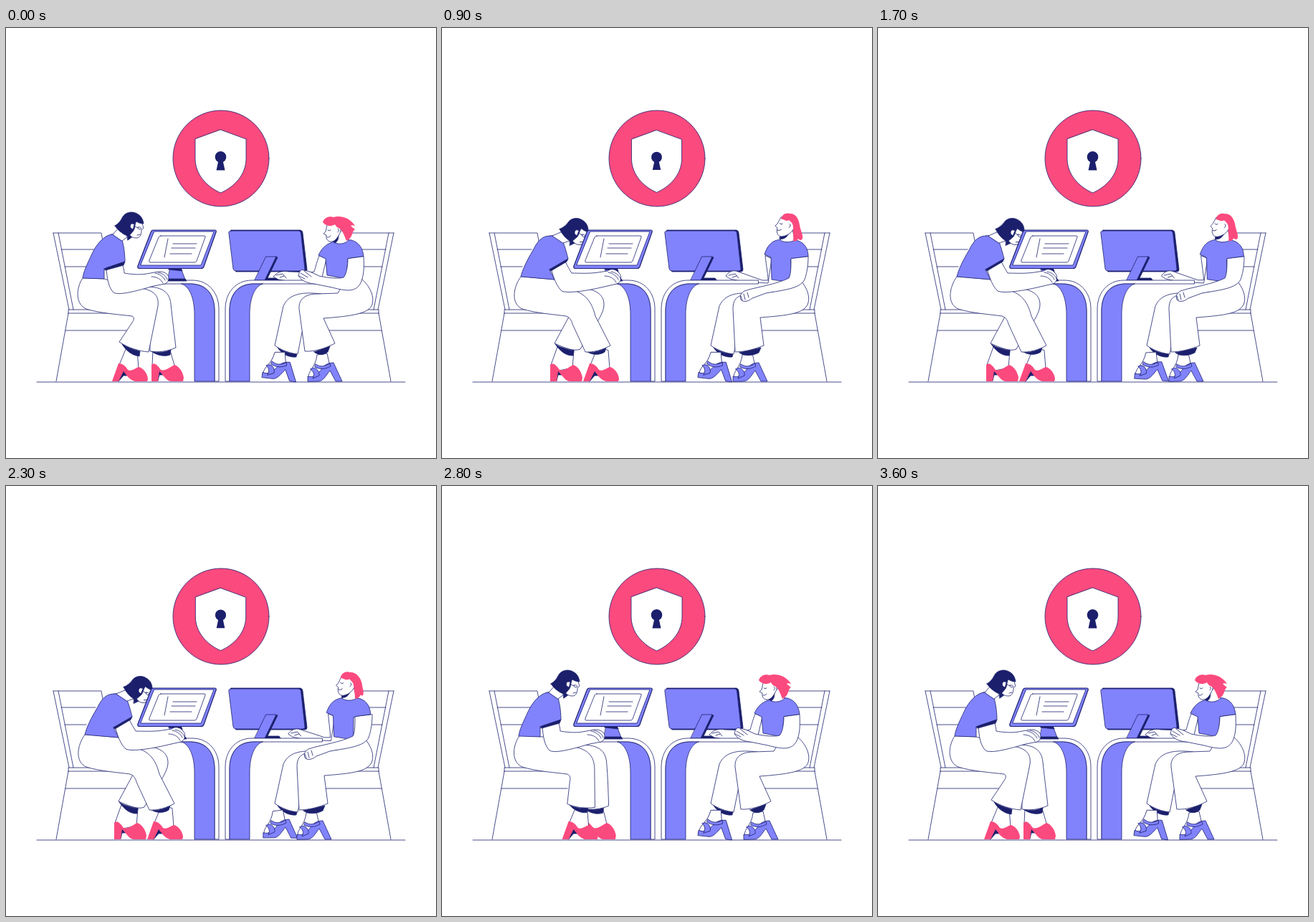
Write an HTML page that moves like this. It is 600 px wide and 600 px high and loops after 3700 ms.

```html
<!DOCTYPE html>
<html lang="en">
<head>
<meta charset="utf-8">
<title>Secure work</title>
<style>
html, body { margin: 0; width: 100%; height: 100%; overflow: hidden; background: #fff; }
svg { display: block; width: 100vw; height: 100vh; stroke: #1e226f; stroke-width: .8; stroke-linejoin: round; stroke-linecap: round; fill: none; }
.w { fill: #fff; }
.p { fill: #8183fd; }
.n { fill: #1b1f6c; }
.k { fill: #fb4a7e; }
.k.bare { stroke: none; }
</style>
</head>
<body>
<svg viewBox="0 0 600 600">
  <defs>
    <path id="chair" d="M66,286H133L139,320M66,286L88,393M73,286L94,393M77,309H125M82,333H112M87,398V393H175M87,398H178M87,398L70,493M83,422H175"/>
    <g id="desk">
      <path class="w" d="M162,352H260C283,352 297,370 297,392V493H291V395C291,372 280,357 258,357H162Z"/>
      <path class="p" d="M245,357H258C280,358 291,372 291,395V493H263V400C263,375 255,360 245,357Z"/>
    </g>
    <g id="sandal">
      <path class="w" d="M422,487C422,477 432,474 434,456L448,454 452,472 440,487Z"/>
      <path class="p" d="M421,493V486C429,489 436,482 441,475 445,469 451,467 457,467L469,493H460L452,478C447,484 443,493 436,493Z"/>
      <path class="p" d="M425,476C431,471 438,478 437,485L428,489C431,484 429,479 425,476ZM432,469C438,473 444,473 452,468L453,472C446,476 438,477 431,473Z"/>
    </g>
  </defs>

  <path d="M43,494H557"/>
  <use href="#chair"/>
  <use href="#chair" transform="matrix(-1 0 0 1 607 0)"/>

  <circle class="k" cx="300" cy="182" r="67"/>
  <path id="shield" class="w" d="M299.500,142L335,155V182C335,205 318,222 299.500,230 281,222 264,205 264,182V155Z"/>
  <path id="keyhole" class="n" stroke="none" d="M296,187A7.900,7.900 0 1 1 303,187L305.500,198.500H293.500Z"/>

  <use href="#desk"/>
  <g id="leftBody"></g>
  <g>
    <path class="p" d="M229,335H244L250,351H226Z"/>
    <path class="n" d="M228,335H244L246,339 227,337ZM225,350H250L252,353H225Z"/>
    <path class="p" stroke-width="1.2" d="M206,282H291Q294,282 293,285L276,333Q275,335.5 272,335.5H186Q183,335 184,332L202,285Q203,282 206,282Z"/>
    <path class="w" d="M207,284H290L272,331H188Z"/>
    <path class="w" d="M216,290H276Q279,290 278,292L266,325Q265,327 263,327H201Q199,327 200,324L213,292Q214,290 216,290ZM226,294L221,320M233,301H266M231,307H264M229,315H259"/>
  </g>
  <g id="leftArm"></g>

  <path class="n" d="M314,282H411Q414,283 414,286L420,337Q420,340 417,340H321Z"/>
  <path class="p" d="M314,283H408Q411,283 411.500,286L417,336Q417.500,339 414,339H321Q318,339 317,336L311,287Q310,283 314,283Z"/>
  <path class="n" d="M376,319L379,320 365,349H381L384,353H360Z"/>
  <path class="p" d="M363,319H377L361,352H347Z"/>
  <g id="reach"></g>
  <use href="#desk" transform="matrix(-1 0 0 1 603 0)"/>
  <g id="rightBody"></g>
</svg>
<script>
const LOOP = 3700, STEP = 100;
const $ = id => document.getElementById(id);

// time, value pairs
const tracks = {
  lean: [[100, 0], [500, 1], [2400, 1], [2800, 0]],
  near: [[100, 0], [500, .72], [800, 1], [2400, 1], [2800, .4], [3200, 0]],
  far: [[100, 0], [450, 1], [2400, 1], [2800, .1], [3000, 0]],
  back: [[200, 0], [500, .28], [900, 1], [1700, .95], [2300, .8], [2800, 0]],
  rest: [[500, 0], [900, 1], [2350, 1], [2800, 0]],
  tap: [[0, 1], [500, 0], [900, 1], [1700, .6], [2300, .1], [2800, 1], [3700, 1]],
  pulse: [[0, 0], [500, 1], [900, -.3], [1700, 0], [2300, -.2], [2800, 0]]
};

function at(track, t) {
  const i = track.findIndex(key => key[0] > t);
  if (i === 0) return track[0][1];
  if (i < 0) return track[track.length - 1][1];
  const [t0, a] = track[i - 1], [t1, b] = track[i];
  return a + (b - a) * (t - t0) / (t1 - t0);
}

const NUM = /-?\d+(\.\d+)?/g;

// blend two paths of the same structure
function mix(a, b, k) {
  const ends = b.match(NUM);
  let i = 0;
  return a.replace(NUM, n => (+n + (ends[i++] - n) * k).toFixed(2));
}

const path = (cls, d) => `<path class="${cls}" d="${d}"/>`;
const blend = (cls, k, a, b) => path(cls, mix(a, b, k));
const group = (transform, ...parts) => `<g transform="${transform}">${parts.join('')}</g>`;

function leftBody({ lean, near, far }) {
  return [
    group(`translate(${-52 * far} 0)`,
      blend('w', far,
        'M205,449L204,472L216,480L236,474L229,450Z',
        'M213,445L204,470L216,478L234,474L236,450Z'),
      path('n', 'M212,476L219,484 214,484 212,492Z'),
      path('k bare', 'M203,493V470C206,467 210,468 216,477C222,479 228,474 235,470C243,473 247,481 248,488L247,493H231C224,493 220,485 214,479L212,493Z')),
    blend('n', far,
      'M203,451C212,454 224,452 230,449L229,456C222,459 210,457 203,451Z',
      'M158,441C165,446 175,449 184,450L183,457C175,458 165,452 158,441Z'),
    blend('w', far,
      'M180,362C215,358 228,366 230,385C232,405 235,428 237,446C226,451 213,453 201,451L200,385Z',
      'M180,362C212,362 226,370 226,386C226,402 205,425 193,448C185,452 170,446 157,440L177,403Z'),
    group(`translate(${49 * near} 0)`,
      path('w', 'M168,446L158,470 170,480 185,475 183,450Z'),
      path('n', 'M163,477L170,485 164,485 157,493Z'),
      path('k bare', 'M148,493L157,468C163,468 167,472 170,477C176,480 180,474 186,473C194,476 198,485 198,490L197,493H180C172,491 168,484 164,479L157,493Z')),
    blend('n', near,
      'M162,441C172,447 180,450 187,451L186,458C176,457 167,450 162,441Z',
      'M203,452C212,454 222,450 229,446L227,452C222,456 210,457 203,452Z'),
    blend('w', near,
      'M107,349C98,362 96,385 112,392C130,398 160,400 176,402C180,404 178,408 176,411L158,438C170,446 185,451 199,452L212,388C214,372 205,364 180,362L137,350Z',
      'M110,347C99,362 96,385 112,392C130,398 160,400 173,402C179,404 181,409 182,413L200,452C210,453 225,449 235,443L214,402C209,382 200,370 180,365L157,351Z'),
    blend('p', lean,
      'M147,288C136,290 126,302 120,315C113,330 108,340 107,349L137,350L137,336L166,326C166,312 163,296 160,291C157,288 152,287 147,288Z',
      'M151,290C140,290 134,296 127,310C118,325 112,338 110,347L157,351L150,337L176,322C172,306 169,298 167,294C163,290 157,289 151,290Z'),
    blend('w', lean, 'M149,288L157,279L174,288L162,297Z', 'M154,290L168,284L184,295L169,300Z'),
    group(`translate(${12 * lean} ${8 * lean}) rotate(${10 * lean} 172 275)`,
      path('n', 'M169,288L177,291 170,296Z'),
      path('w', 'M174,266H188C190,272 191,277 192,279L189,282C189,288 187,293 182,293C177,293 173,291 171,286Z'),
      path('n', 'M152,276C157,273 160,269 162,265C165,259 170,257 176,257C185,258 191,264 192,273C188,273 185,272 182,270C179,273 181,281 176,285C174,288 172,290 169,290C162,287 156,282 152,276Z'),
      path('w', 'M179,274C175,271 172,275 174,279L177,281Z'),
      path('', 'M178,276L184,279M184,278q4,-1 5,2q-4,3 -5,-2M183,289l4,-1'))
  ].join('');
}

function leftArm({ lean }) {
  return [
    blend('w', lean,
      'M140,335C141,350 143,362 150,369C158,374 185,366 206,360L222,357C227,355 228,349 226,345C220,338 212,340 207,341L196,343C185,345 170,343 165,342C165,337 163,332 162,328Z',
      'M153,338C156,350 160,360 167,367C176,371 205,366 222,362L244,357C250,355 251,347 248,343C243,336 236,335 231,339L218,341C205,343 190,342 181,342C178,337 175,332 172,326Z'),
    group(`translate(${24 * lean} ${-lean})`,
      path('', 'M208,342C214,343 220,347 222,352M212,341C219,342 224,347 225,351M203,347C210,347 216,350 219,356')),
    blend('n', lean, 'M137,336L166,326L164,331L139,338Z', 'M150,337L176,322L174,326L152,339Z')
  ].join('');
}

function reach({ back, rest }) {
  const k = (back + rest) / 2;
  return blend('w', k,
    'M437,318C433,328 432,334 430,340L425,341L395,340C385,338 378,341 373,347L380,351L400,354L440,352L447,322Z',
    'M451,318C453,335 455,345 455,352L447,352L413,340C406,337 400,340 396,346L402,350L420,354L455,356L460,322Z') +
    group(`translate(${23 * k} 0)`, path('', 'M377,345L386,343 391,349M382,348L388,346'));
}

function rightBody({ back, rest, tap }) {
  const typing = `M${499 + 12 * back},319C${500 + 11 * back},335 ${499 + 9 * back},345 ${496 + 9 * back},353C${490 + 8 * back},370 474,367 455,362L430,357C420,356 413,353 408,346C409,340 411,336 416,338L424,340L437,346C450,349 465,350 471,348C475,344 ${477 + 9 * back},332 ${477 + 10 * back},322Z`;
  const resting = 'M511,319C511,335 508,345 506,351C500,364 474,366 452,370L433,377C427,382 420,383 417,379C415,374 417,370 422,367L432,364L445,361C458,358 474,354 484,349C487,344 487,332 487,322Z';
  return [
    path('n', 'M379,446C388,452 398,455 406,454L405,459C395,460 385,455 379,446Z'),
    `<use href="#sandal" transform="rotate(${8 * tap} 385 475) translate(-62 -2)"/>`,
    path('w', 'M440,371C415,368 395,370 387,388L375,443C385,450 397,454 407,455L418,400 440,390Z'),
    `<use href="#sandal" transform="translate(${-15 * rest} 0)"/>`,
    blend('n', rest,
      'M430,452L452,444L449,452C443,457 436,457 430,452Z',
      'M415,453L445,446L442,453C435,457 422,459 415,453Z'),
    blend('w', rest,
      'M496,350C506,358 516,375 510,388C504,398 485,402 443,405L459,440C446,447 430,452 417,451L409,392C408,378 418,371 435,371L463,370L478,345Z',
      'M500,352C508,360 515,375 510,386C504,398 485,401 444,404L449,443C437,448 422,452 409,452L406,392C406,378 412,372 430,371L463,368L486,350Z'),
    blend('p', back,
      'M459,298C450,300 442,304 436,317L446,322L448,345L475,350L477,322L499,319C498,308 493,299 482,296C474,295 466,296 459,298Z',
      'M473,295C463,296 455,300 450,316L459,320L460,351L487,355L487,323L511,319C511,308 506,300 497,297C488,295 480,294 473,295Z'),
    blend('w', rest, typing, resting),
    blend('', rest,
      'M409,346L417,350M411,342L421,348M416,339L426,347',
      'M417,374L419,380M421,371L423,379M426,369L428,376'),
    blend('w', back,
      'M457,292L458,299C464,303 474,301 478,296L470,282Z',
      'M474,290L472,296C478,300 488,299 492,296L489,280Z'),
    blend('n', back,
      'M456,297C460,295 463,291 464,288C464,294 463,298 459,300Z',
      'M472,291C477,291 482,287 485,284C483,290 478,296 471,294Z'),
    blend('w', back,
      'M449,272C447,277 447,281 446,284L443,287L447,289C446,294 449,299 455,298C460,297 463,292 467,284L467,272Z',
      'M473,264C471,268 469,271 468,273L465,276L468,279C466,284 468,291 474,291C482,290 487,286 491,280L491,266Z'),
    blend('k bare', back,
      'M442,271C444,264 452,262 457,264C465,261 480,264 487,276C484,275 482,275 481,276C484,279 486,280 487,281C482,284 485,292 475,297C472,289 470,284 466,280C463,279 460,277 459,274C453,278 446,276 442,271Z',
      'M473,267C474,260 480,257 486,259C494,259 498,267 499,275C500,282 504,288 503,294C501,297 499,296 497,294C495,298 492,298 490,297C491,290 489,284 490,278C490,272 486,270 484,268C480,271 476,266 473,267Z'),
    group(`translate(${21 * back} ${-9 * back}) rotate(${12 * back} 452 287)`,
      path('', 'M449,282q2,2 4,0M448,292q3,1 5,-2M463,280q3,2 0,5'))
  ].join('');
}

const swell = k => `translate(299.5 186) scale(${k}) translate(-299.5 -186)`;

function draw(t) {
  const pose = {};
  for (const name in tracks) pose[name] = at(tracks[name], t);
  $('leftBody').innerHTML = leftBody(pose);
  $('leftArm').innerHTML = leftArm(pose);
  $('reach').innerHTML = reach(pose);
  $('rightBody').innerHTML = rightBody(pose);
  $('shield').setAttribute('transform', swell(1 + .045 * pose.pulse));
  $('keyhole').setAttribute('transform', swell(1 + .15 * pose.pulse));
}

const start = performance.now();
let shown = -1;
function tick() {
  const t = Math.max(0, performance.now() - start) % LOOP;
  const step = Math.floor(t / STEP);
  if (step !== shown) draw((shown = step) * STEP);
  requestAnimationFrame(tick);
}
tick();
</script>
</body>
</html>
```
